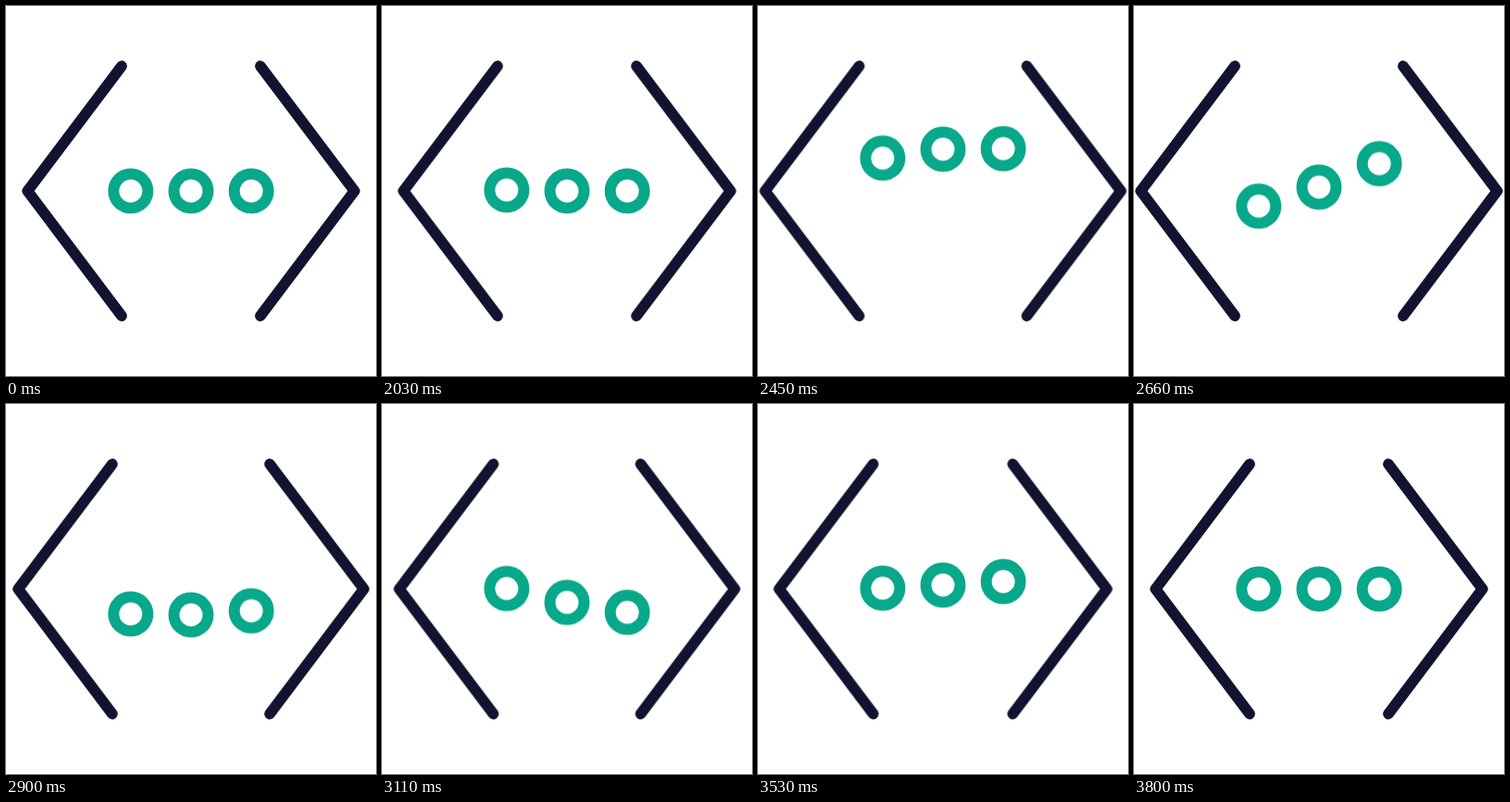
Animation of 400 by 400 pixels, one loop 3.83 s. Source, as an HTML page without scripts:

```html
<!DOCTYPE html>
<html lang="en">
<head>
<meta charset="utf-8">
<title>Code icon</title>
<style>
  html, body { margin: 0; width: 100%; height: 100%; overflow: hidden; background: #fff; }
  svg { display: block; width: 100%; height: 100%; fill: none; }

  .bracket {
    stroke: #121331;
    stroke-width: 11.8;
    stroke-linecap: round;
    stroke-linejoin: round;
    animation: spread 3830ms infinite;
  }
  .dot {
    stroke: #08a88a;
    stroke-width: 12;
    /* each dot follows the previous one by 90 ms */
    animation: bounce 3830ms calc(var(--i) * 90ms) infinite;
  }

  @keyframes spread {
    0%, 52.219% { transform: translateX(0); animation-timing-function: cubic-bezier(.33, 0, .15, 1); }
    67.885% { transform: translateX(-16.2px); animation-timing-function: cubic-bezier(.28, 0, .2, 1); }
    99.217%, 100% { transform: translateX(0); }
  }
  @keyframes bounce {
    0%, 52.219% { transform: translateY(0); animation-timing-function: cubic-bezier(.4, 0, .6, 1); }
    60.052% { transform: translateY(-46.7px); animation-timing-function: cubic-bezier(.5, 0, .42, 1); }
    74.151% { transform: translateY(28.1px); animation-timing-function: cubic-bezier(.5, 0, .5, 1); }
    85.117% { transform: translateY(-9.3px); animation-timing-function: cubic-bezier(.45, 0, .5, 1); }
    94.517%, 100% { transform: translateY(0); }
  }
</style>
</head>
<body>
<svg viewBox="0 0 400 400">
  <path class="bracket" d="M125 65 23.3 200 125 335"/>
  <g transform="matrix(-1 0 0 1 400 0)">
    <path class="bracket" d="M125 65 23.3 200 125 335"/>
  </g>
  <circle class="dot" style="--i:0" cx="134.8" cy="200" r="18.5"/>
  <circle class="dot" style="--i:1" cx="200" cy="200" r="18.5"/>
  <circle class="dot" style="--i:2" cx="265.2" cy="200" r="18.5"/>
</svg>
</body>
</html>
```
